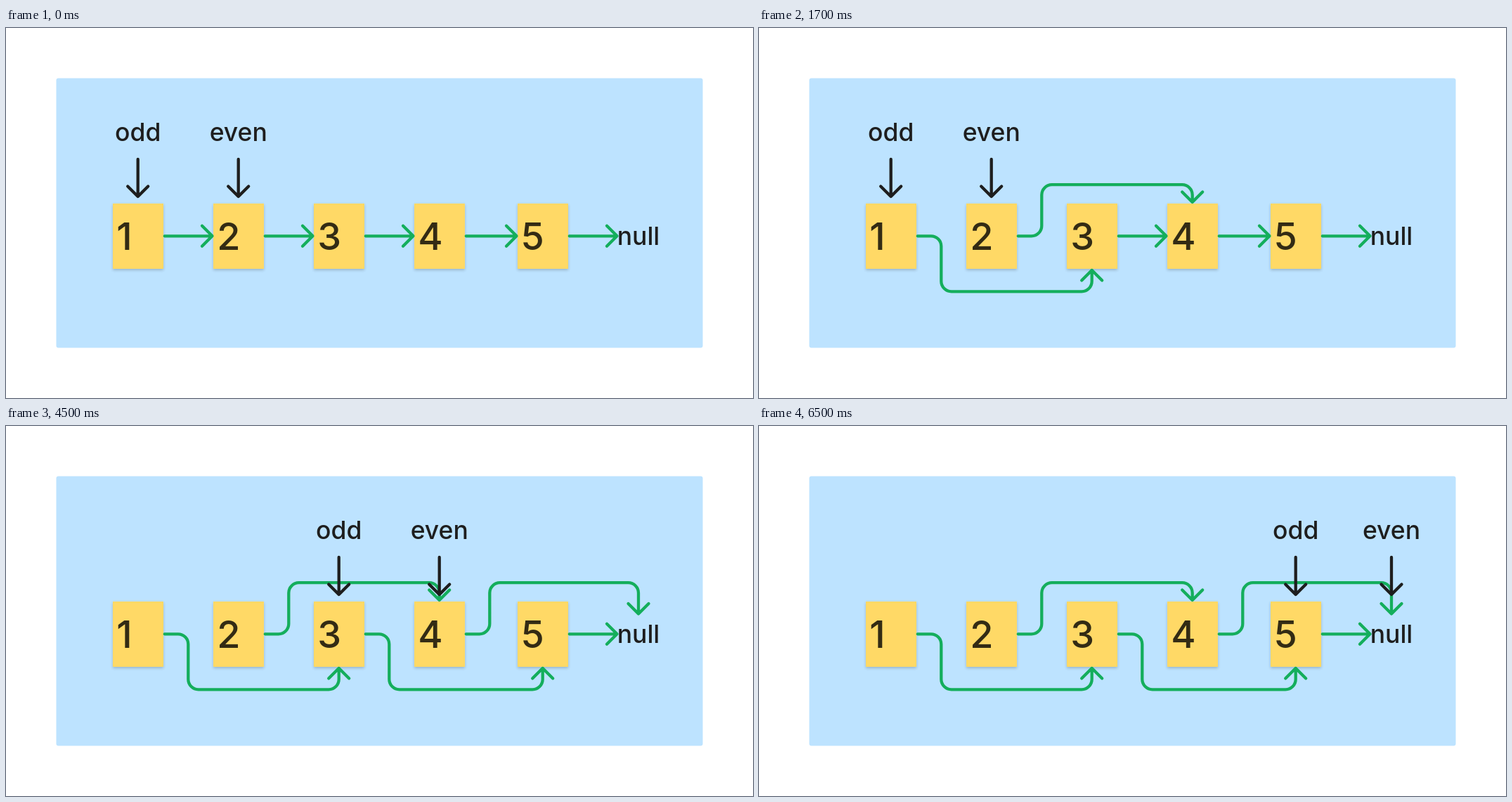
Animation, 1063 px wide and 527 px high, one loop 8 s. Source, as an HTML page with a canvas:

```html
<!DOCTYPE html>
<html lang="en">
<head>
<meta charset="utf-8">
<title>Odd even linked list</title>
<style>
html, body { margin: 0; width: 100%; height: 100%; overflow: hidden; background: #fff; }
canvas { display: block; width: 1063px; height: 527px; }
</style>
</head>
<body>
<canvas id="stage" width="1063" height="527"></canvas>
<script>
const ctx = document.getElementById('stage').getContext('2d');
const GREEN = '#14ae5c', INK = '#1e1e1e';
const LOOP = 8000, STEPS = [500, 2500, 4500, 6500];
const boxes = [152, 295, 438, 581, 728];
const W = 72, TOP = 250, H = 93, MID = 296.3;
const NULL_X = 900;
const mids = [...boxes.map(x => x + W / 2 - 0.3), NULL_X];

function text(str, x, y, size, color, align) {
  ctx.font = `500 ${size}px Inter, "Liberation Sans", sans-serif`;
  ctx.textAlign = align;
  ctx.fillStyle = color;
  ctx.fillText(str, x, y);
}

// Rounded polyline ending in an open arrowhead
function arrow(points, color) {
  const n = points.length, [ex, ey] = points[n - 1], [px, py] = points[n - 2];
  const dx = Math.sign(ex - px), dy = Math.sign(ey - py), s = 14.5;
  ctx.strokeStyle = color;
  ctx.lineWidth = 4.3;
  ctx.lineCap = ctx.lineJoin = 'round';
  ctx.beginPath();
  ctx.moveTo(...points[0]);
  for (let i = 1; i < n - 1; i++) ctx.arcTo(...points[i], ...points[i + 1], 14.5);
  ctx.lineTo(ex, ey);
  ctx.moveTo(ex - dx * s - dy * s, ey - dy * s - dx * s);
  ctx.lineTo(ex, ey);
  ctx.lineTo(ex - dx * s + dy * s, ey - dy * s + dx * s);
  ctx.stroke();
}

function note(x, label) {
  ctx.save();
  ctx.shadowColor = 'rgba(0, 0, 0, 0.2)';
  ctx.shadowBlur = 4;
  ctx.shadowOffsetY = 2;
  ctx.fillStyle = '#ffd966';
  ctx.fillRect(x, TOP, W, H);
  ctx.restore();
  text(label, x + 5.3, 316, 54, '#332b14', 'left');
}

function straight(i) {
  const end = i < 4 ? boxes[i + 1] - 1.5 : 869.5;
  arrow([[boxes[i] + W + 1.7, MID], [end, MID]], GREEN);
}

// Odd nodes route below, even nodes route above
function skip(i) {
  const odd = i % 2 === 0, start = boxes[i] + W + 1.7, bend = boxes[i] + 107.3;
  const y = odd ? 375.3 : 223.2, to = mids[i + 2];
  const end = odd ? 345 : i === 3 ? 267.5 : 248;
  arrow([[start, MID], [bend, MID], [bend, y], [to, y], [to, end]], GREEN);
}

function pointer(label, x) {
  text(label, x, 161, 35.5, INK, 'center');
  arrow([[x, 187], [x, 240]], INK);
}

function draw(time) {
  const step = STEPS.filter(t => time >= t).length;
  const linked = step >= 3 ? 4 : step >= 1 ? 2 : 0;
  const at = step >= 4 ? 4 : step >= 2 ? 2 : 0;

  ctx.fillStyle = '#fff';
  ctx.fillRect(0, 0, 1063, 527);
  ctx.fillStyle = '#bde3ff';
  ctx.beginPath();
  ctx.roundRect(71.5, 71.5, 920, 384, 3);
  ctx.fill();

  boxes.forEach((x, i) => note(x, String(i + 1)));
  text('null', NULL_X, 309, 35.5, INK, 'center');
  boxes.forEach((x, i) => i < linked ? skip(i) : straight(i));
  pointer('odd', mids[at]);
  pointer('even', mids[at + 1]);
}

const begin = performance.now();
function tick(now) {
  draw(Math.max(0, now - begin) % LOOP);
  requestAnimationFrame(tick);
}
draw(0);
requestAnimationFrame(tick);
</script>
</body>
</html>
```
